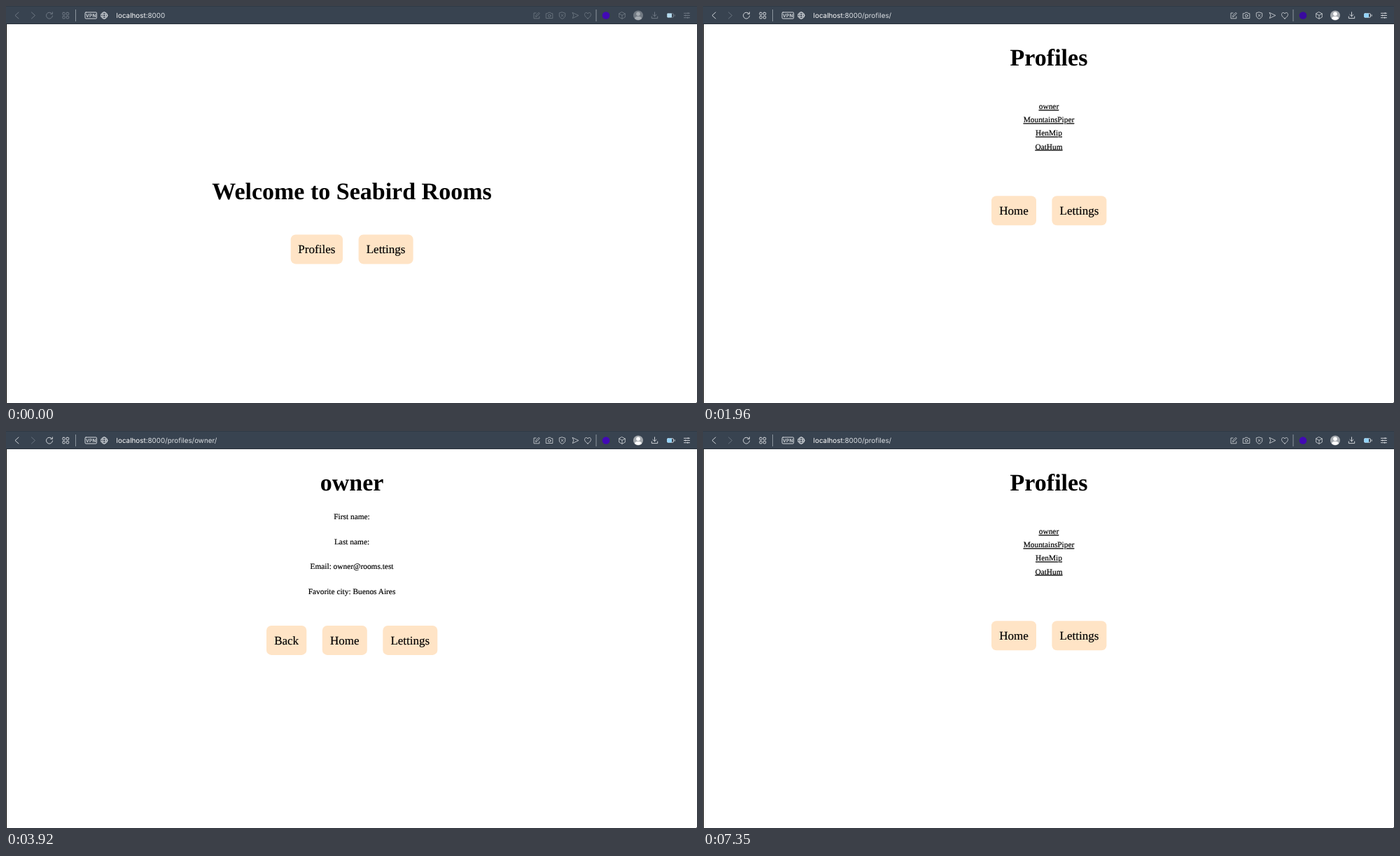
Animation, 987 px wide and 567 px high, one loop 8000 ms. Source, as an HTML page:

```html
<!DOCTYPE html>
<html lang="en">
<head>
<meta charset="utf-8">
<title>Seabird Rooms</title>
<style>
  html, body { margin: 0; width: 100%; height: 100%; overflow: hidden; background: #fff; }
  svg { display: block; width: 987px; height: 567px; }
  text { text-rendering: geometricPrecision; font-variant-ligatures: common-ligatures; }
  .page { font: 11.36px "Liberation Serif", Tinos, serif; text-anchor: middle; display: none; }
  .page.on { display: block; }
  .page text { fill: currentColor; stroke: currentColor; stroke-width: .18px; }
  .page .title { font-size: 34px; font-weight: 700; stroke: none; }
  .button rect { fill: #ffe4c6; }
  .button text { font-size: 17.04px; }
  .link { text-decoration: underline; }
  .link.hover { color: #8b4513; }

  #bar { --ink: #d6dade; --weak: #6c7782; --face: #a4a9ae; --body: #fff; --cell: #93d3f8; }
  #bar.idle { --ink: #717b86; --weak: #717b86; --face: #727a83; --body: #a6acb2; --cell: #b5dcf0; }
  .icon { fill: none; stroke: var(--ink); stroke-width: .95; stroke-linecap: round; stroke-linejoin: round; }
  .fine { stroke-width: .8; }
  .weak { stroke: var(--weak); }
  .fixed { stroke: #dfe3e7; }
  .rule { stroke: #8c959e; stroke-width: 1; }
  .badge { font: 600 6.6px Inter, sans-serif; fill: #e3e7ea; text-anchor: middle; letter-spacing: .3px; }
  .url { font: 9.85px Inter, sans-serif; fill: #dde1e5; }
  .host { fill: #fff; }
  #mark { fill: #4209b5; }
  #mark.busy { fill: #390a9f; }
  .off { display: none; }
</style>
</head>
<body>
<svg viewBox="0 0 987 567" xmlns="http://www.w3.org/2000/svg">
  <rect width="987" height="567" fill="#fff"/>
  <g id="pages"></g>
  <rect y="26" width="1" height="541"/>
  <rect x="986" y="566" width="1" height="1" fill="#555"/>

  <g id="bar">
    <rect width="987" height="26" fill="#384350"/>
    <rect width="987" height="1" fill="#303a46"/>
    <rect y="25" width="987" height="1" fill="#28313b"/>

    <path class="icon" d="M18 9L13 13.5L18 18"/>
    <path class="icon weak" d="M36.5 9L41.5 13.5L36.5 18"/>
    <path id="reload" class="icon" d="M65.6 10.9A4.5 4.5 0 1 0 66.5 14M66.4 8.8V11.4H63.7"/>
    <path id="stop" class="icon" d="M58.3 9.8L65.7 17.2M65.7 9.8L58.3 17.2"/>
    <g class="icon">
      <rect x="80.9" y="9.3" width="3.4" height="3.4" rx=".8"/>
      <rect x="86.3" y="9.3" width="3.4" height="3.4" rx=".8"/>
      <rect x="80.9" y="14.5" width="3.4" height="3.4" rx=".8"/>
      <rect x="86.3" y="14.5" width="3.4" height="3.4" rx=".8"/>
    </g>
    <path class="rule" d="M99.5 5V22"/>

    <rect class="icon fixed" x="113" y="9" width="16.5" height="9" rx="1.2"/>
    <text class="badge" x="121.4" y="15.9">VPN</text>
    <g class="icon fixed">
      <circle cx="140.3" cy="13.5" r="4.6"/>
      <ellipse cx="140.3" cy="13.5" rx="2.1" ry="4.6"/>
      <path d="M136 12H144.6M136 15H144.6"/>
    </g>
    <text class="url" x="157.6" y="17"><tspan class="host">localhost</tspan><tspan>:8000</tspan><tspan id="path"></tspan></text>

    <g class="icon fine">
      <path d="M757 10H754V17.8H761.8V15M756.7 15.2L757.1 13.3L761 9.3L762.3 10.6L758.4 14.7Z"/>
      <path d="M771.7 10.7H773.7L774.7 9.3H777.7L778.7 10.7H780.8V17.5H771.7Z"/>
      <circle cx="776.2" cy="13.9" r="1.8"/>
      <path d="M794.5 8.9L798.7 10.2V14C798.7 16 796.5 17.6 794.5 18.3C792.5 17.6 790.3 16 790.3 14V10.2Z"/>
      <path d="M793 12L796 15M796 12L793 15"/>
      <path d="M809.3 9.5L817.8 13.5L809.3 17.5L810.7 13.5Z"/>
      <path d="M831 18C824 13.5 826.5 9.3 829 9.5Q830.5 9.7 831 11Q831.5 9.7 833 9.5C835.5 9.3 838 13.5 831 18Z"/>
    </g>
    <path class="rule" d="M843 5V22"/>
    <circle id="mark" cx="857" cy="13.5" r="5.3"/>
    <path class="icon fine" d="M880 8.7L884.3 11V16L880 18.3L875.7 16V11ZM875.7 11L880 13.3L884.3 11M880 13.3V18.3"/>

    <circle cx="903" cy="13.5" r="7" fill="var(--face)"/>
    <circle cx="903" cy="11.2" r="2.8" fill="var(--body)"/>
    <path d="M898 18.1Q898.6 14.8 903 14.8Q907.4 14.8 908 18.1Q903 22 898 18.1Z" fill="var(--body)"/>

    <path class="icon" d="M926.5 8.8V14.7M924 12.4L926.5 14.8L929 12.4M922.3 15V17.6H930.7V15"/>
    <rect class="icon" x="944.5" y="10.8" width="9" height="5.4" rx="1"/>
    <rect x="944.3" y="10.6" width="6.7" height="5.8" rx=".8" fill="var(--cell)"/>
    <path class="icon" d="M955.2 12.7V14.3"/>
    <path class="icon" d="M968.5 10.3H976.5M968.5 13.5H976.5M968.5 16.7H976.5M974.3 9.6V11M970.7 12.8V14.2M973.7 16V17.4"/>
  </g>
</svg>

<script>
const LOOP = 8000, CENTER = 494;
const $ = id => document.getElementById(id);

const text = (y, label, cls = "", x = CENTER) =>
  `<text class="${cls}" x="${x}" y="${y}">${label}</text>`;

const button = (x, y, w, label) =>
  `<g class="button"><rect x="${x}" y="${y}" width="${w}" height="42" rx="7"/>` +
  text(y + 26.8, label, "", x + w / 2) + "</g>";

const users = ["owner", "MountainsPiper", "HenMip", "OatHum"];
const facts = ["First name:", "Last name:", "Email: owner@rooms.test", "Favorite city: Buenos Aires"];

const pages = {
  home: text(276, "Welcome to Seabird Rooms", "title") +
    button(406.7, 326.4, 74.3, "Profiles") + button(503.6, 326.4, 78, "Lettings"),
  list: text(85, "Profiles", "title") +
    users.map((name, i) => text(147.2 + i * 19.1, name, "link")).join("") +
    button(412, 271.2, 64, "Home") + button(498.4, 271.2, 78, "Lettings"),
  user: text(85, users[0], "title") +
    facts.map((line, i) => text(126.1 + i * 35.6, line)).join("") +
    button(372, 277.9, 57.3, "Back") + button(451.8, 277.9, 64, "Home") +
    button(538.3, 277.9, 78, "Lettings")
};
$("pages").innerHTML = Object.entries(pages)
  .map(([name, body]) => `<g class="page" id="${name}">${body}</g>`).join("");
const links = [...document.querySelectorAll(".link")];

// Each step changes only the listed parts of the state.
const steps = [
  [0, { page: "home", path: "", idle: true, loading: false, busy: false, hover: -1 }],
  [1400, { idle: false }],
  [1470, { loading: true }],
  [1820, { path: "/profiles/", busy: true }],
  [1960, { page: "list", loading: false }],
  [2520, { busy: false }],
  [2730, { hover: 2 }],
  [3080, { hover: 1 }],
  [3220, { hover: -1 }],
  [3290, { hover: 0 }],
  [3780, { loading: true }],
  [3850, { path: `/profiles/${users[0]}/`, busy: true }],
  [3920, { page: "user", loading: false, busy: false, hover: -1 }],
  [7140, { loading: true }],
  [7210, { path: "/profiles/", loading: false, busy: true }],
  [7350, { page: "list", busy: false }]
];

function draw(t) {
  const s = Object.assign({}, ...steps.filter(([at]) => at <= t).map(([, change]) => change));
  for (const name in pages) $(name).classList.toggle("on", name === s.page);
  links.forEach((link, i) => link.classList.toggle("hover", i === s.hover));
  $("bar").classList.toggle("idle", s.idle);
  $("reload").classList.toggle("off", s.loading);
  $("stop").classList.toggle("off", !s.loading);
  $("mark").classList.toggle("busy", s.busy);
  $("path").textContent = s.path;
}

const start = performance.now();
function tick() {
  draw((performance.now() - start) % LOOP);
  requestAnimationFrame(tick);
}
tick();
</script>
</body>
</html>
```
